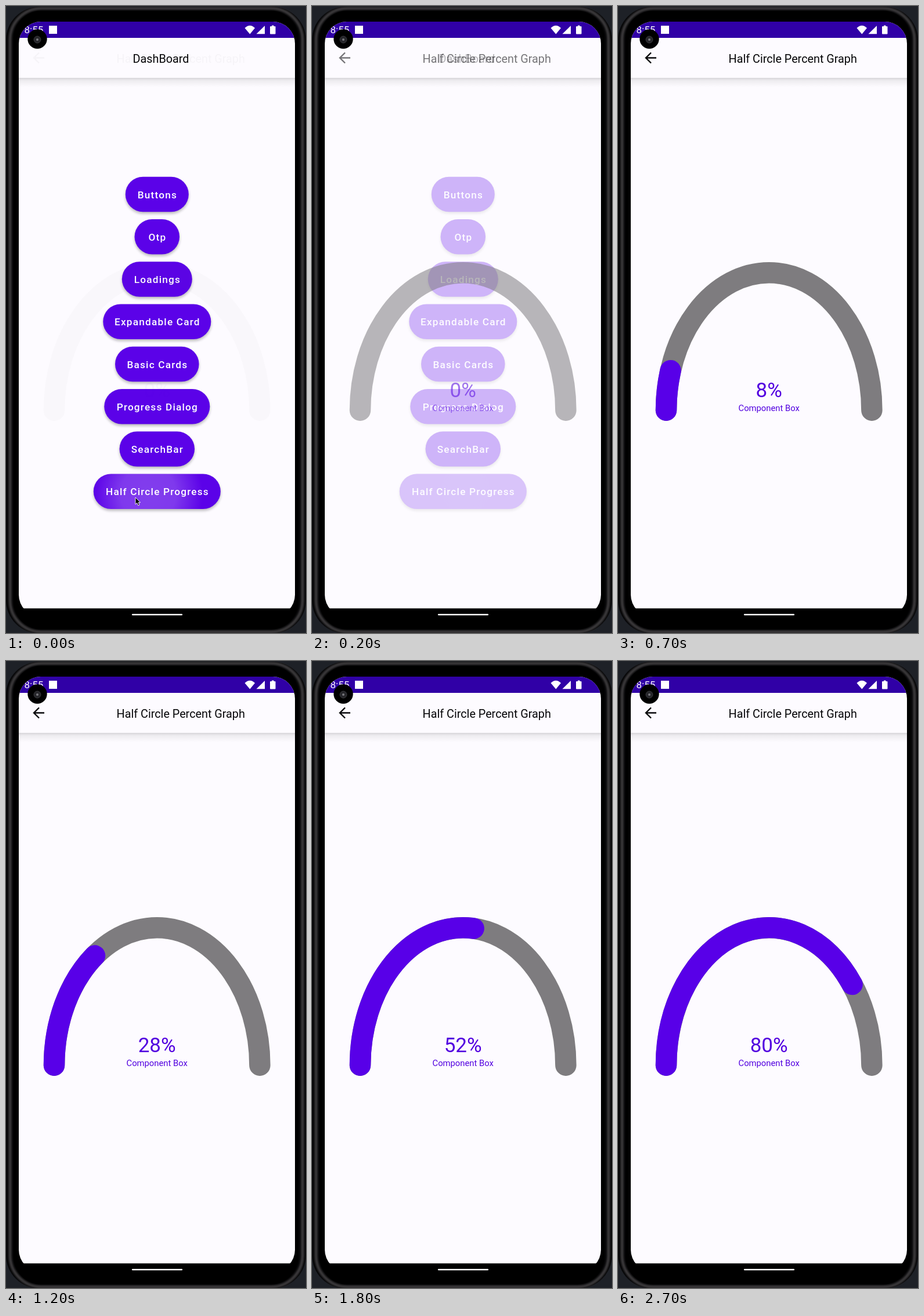
These frames come from a looping animation (517 px wide and 1082 px high, 2.8 s). An HTML page:

```html
<!DOCTYPE html>
<html lang="en">
<head>
<meta charset="utf-8">
<title>Half circle progress</title>
<style>
  html, body { margin: 0; width: 100%; height: 100%; overflow: hidden; background: #1e2127; }
  svg { display: block; width: 100%; height: 100%; font-family: Roboto, sans-serif; }
  .title { font-size: 19.8px; fill: #060608; text-anchor: middle; }
  .button rect { fill: #5a00e8; filter: drop-shadow(0 3px 2.5px rgba(0, 0, 0, .28)); }
  .button text { font-size: 17.2px; font-weight: 500; letter-spacing: 1.2px; fill: #fff; text-anchor: middle; }
  .arc { fill: none; stroke-width: 36.5; stroke-linecap: round; }
  .stat { fill: #5200e0; text-anchor: middle; }
  .rim { fill: none; stroke: #3d3b3d; stroke-width: 5; filter: blur(1.5px); }
</style>
</head>
<body>
<svg viewBox="0 0 517 1082">
  <defs>
    <clipPath id="screen"><rect x="22" y="27" width="476" height="1027" rx="38"/></clipPath>
    <linearGradient id="barShadow" x1="0" y1="0" x2="0" y2="1">
      <stop offset="0" stop-color="#000" stop-opacity=".15"/>
      <stop offset=".3" stop-color="#000" stop-opacity=".06"/>
      <stop offset="1" stop-color="#000" stop-opacity="0"/>
    </linearGradient>
    <radialGradient id="ripple" gradientUnits="userSpaceOnUse">
      <stop offset="0" stop-color="#fff" stop-opacity=".24"/>
      <stop offset=".5" stop-color="#fff" stop-opacity=".22"/>
      <stop offset="1" stop-color="#fff" stop-opacity="0"/>
    </radialGradient>
  </defs>

  <!-- phone body -->
  <rect x="0" y="1" width="517" height="1082" rx="58" fill="#050506"/>
  <rect class="rim" x="7" y="4" width="504" height="1076" rx="54"/>
  <rect x="13" y="8" width="491" height="1068" rx="48"/>

  <g clip-path="url(#screen)">
    <rect x="22" y="27" width="476" height="1012.500" fill="#fdfbff"/>
    <rect x="22" y="124" width="476" height="16" fill="url(#barShadow)"/>
    <rect x="22" y="27" width="476" height="28" fill="#3000a6"/>
    <g fill="#fff">
      <text x="31.500" y="47" font-size="17">8:55</text>
      <rect x="74" y="34" width="14" height="14"/>
      <path d="M411.500 38Q420.300 29.500 429 38L420.300 48.500Z"/>
      <path d="M431.500 48.300L446 34V48.300Z"/>
      <path d="M455 36q0-1 1-1h2v-1.500h3.500V35h2q1 0 1 1v11.500q0 1-1 1H456q-1 0-1-1Z"/>
    </g>
    <g id="menu">
      <text class="title" x="267" y="98">DashBoard</text>
    </g>
    <g id="graph">
      <path d="M66 89.500H48.500M57 80.500L48 89.500L57 98.500" fill="none" stroke="#060608" stroke-width="2.400"/>
      <text class="title" x="301.200" y="98">Half Circle Percent Graph</text>
      <path class="arc" stroke="#7e7c7f" d="M83 697.700A177.200 237.500 0 0 1 437.400 697.700"/>
      <path class="arc" id="progress" stroke="#5800e8"/>
      <text class="stat" id="percent" x="260.200" y="675" font-size="35"></text>
      <text class="stat" x="260.200" y="699" font-size="14.800">Component Box</text>
    </g>
  </g>

  <circle cx="54" cy="57" r="16.700"/>
  <circle cx="54" cy="58" r="6" fill="#26262a" stroke="#38383c"/>
  <circle cx="54" cy="58" r="2" fill="#77777c"/>
  <rect x="217" y="1049" width="87" height="2.600" rx="1.300" fill="#fff"/>
  <path id="cursor" d="M0 0V12L2.800 9.500L4.800 14L7 13L5 8.800H8.600Z" stroke="#fff" stroke-width=".9"/>
</svg>
<script>
const $ = id => document.getElementById(id);
const LOOP = 2800, STEP = 100;

const buttons = [
  ['Buttons', 109], ['Otp', 77.5], ['Loadings', 121], ['Expandable Card', 186],
  ['Basic Cards', 144.5], ['Progress Dialog', 182], ['SearchBar', 129.5], ['Half Circle Progress', 219]
];
const pill = (w, y, extra = '') =>
  `<rect x="${260.3 - w / 2}" y="${y}" width="${w}" height="60.5" rx="30.25" ${extra}/>`;

$('menu').innerHTML += buttons.map(([label, w], i) => {
  const y = 294.7 + i * 73.25;
  const wave = i === 7 ? pill(w, y, 'style="fill:url(#ripple);filter:none"') : '';
  return `<g class="button">${pill(w, y)}${wave}<text x="260.9" y="${y + 37}">${label}</text></g>`;
}).join('');

const clamp = v => Math.min(1, Math.max(0, v));

// cubic-bezier(.4, 0, .2, 1), solved by bisection
function ease(x) {
  let lo = 0, hi = 1;
  x = clamp(x);
  for (let i = 0; i < 24; i++) {
    const s = (lo + hi) / 2, r = 1 - s;
    if (1.2 * r * r * s + .6 * r * s * s + s ** 3 < x) lo = s; else hi = s;
  }
  return 3 * (1 - lo) * lo * lo + lo ** 3;
}

function arcTo(part) {
  if (!part) return '';
  const a = part * Math.PI;
  return `M83 697.7A177.2 237.5 0 0 1 ${260.2 - 177.2 * Math.cos(a)} ${697.7 - 237.5 * Math.sin(a)}`;
}

function draw(t) {
  $('menu').setAttribute('opacity', 1 - ease(.05 + t * .00203));
  $('graph').setAttribute('opacity', ease(.104 + t * .00132));

  const ripple = $('ripple');
  ripple.setAttribute('cx', 245 + t * .1);
  ripple.setAttribute('cy', 842 - t * .04);
  ripple.setAttribute('r', 95 + t * .8);

  $('cursor').setAttribute('transform', `translate(${223 - t * .68} ${848 + t * .34})`);
  $('cursor').setAttribute('visibility', t < 200 ? 'visible' : 'hidden');

  // the number trails the arc slightly
  $('progress').setAttribute('d', arcTo(.8 * clamp((t - 467) / 2000)));
  $('percent').textContent = Math.round(80 * clamp((t - 500) / 2000)) + '%';
}

let start;
function tick(now) {
  start ??= now;
  draw(Math.floor((now - start) % LOOP / STEP) * STEP);
  requestAnimationFrame(tick);
}
draw(0);
requestAnimationFrame(tick);
</script>
</body>
</html>
```
